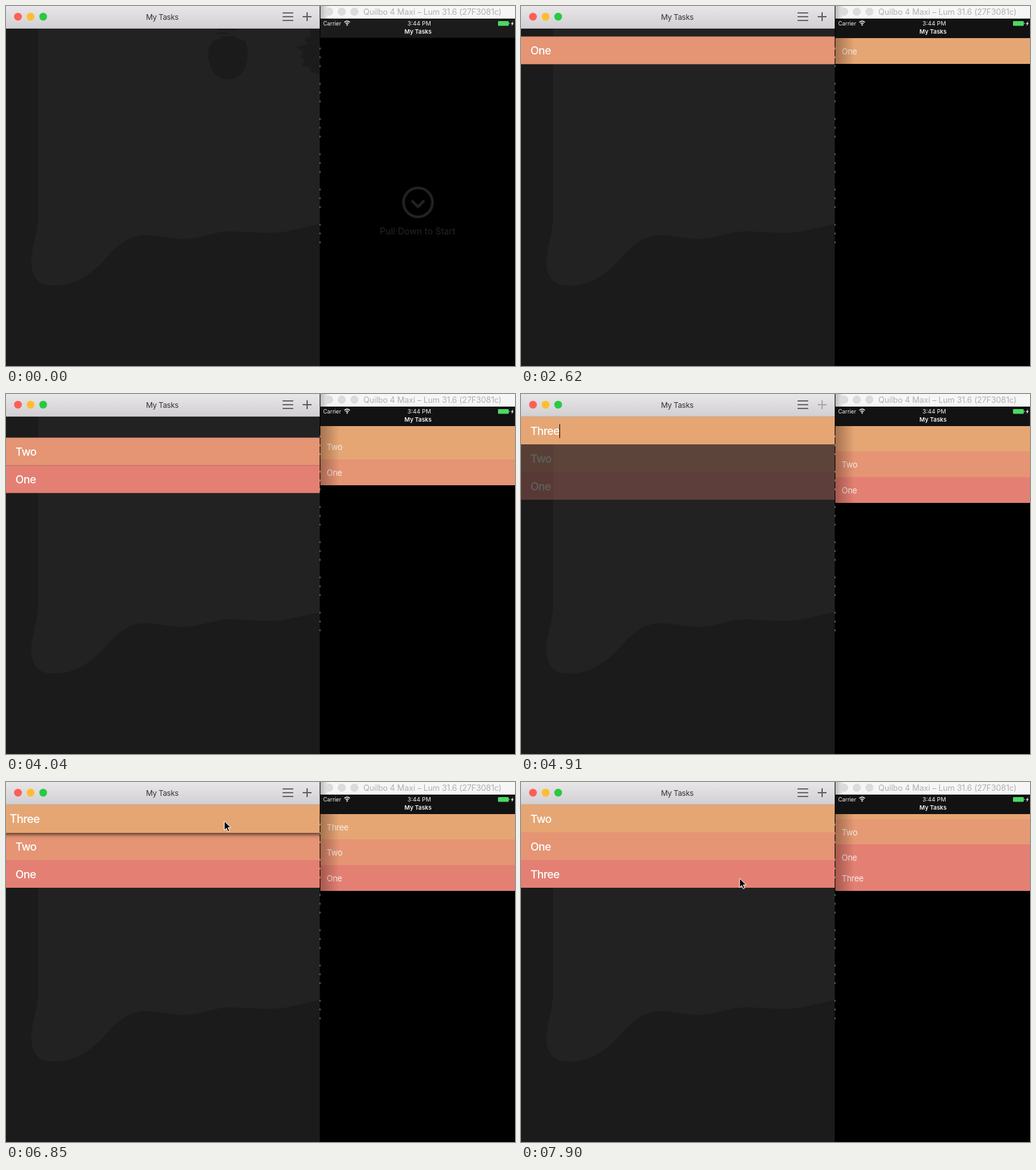
Write an HTML page that moves like this. It is 808x572 px and loops after 7.99 s.

```html
<!DOCTYPE html>
<html lang="en">
<head>
<meta charset="utf-8">
<title>My Tasks</title>
<style>
html, body { margin: 0; width: 100%; height: 100%; overflow: hidden; background: #000; }
#stage { position: relative; width: 808px; height: 572px; overflow: hidden; font-family: Inter, Roboto, sans-serif; }
#stage > svg { position: absolute; left: 0; top: 0; }
.pane { position: absolute; overflow: hidden; isolation: isolate; }
#mac { left: 0; top: 36px; width: 498px; height: 536px; }
#phone { left: 499px; top: 51px; width: 309px; height: 521px; }
.row { position: absolute; left: 0; top: 0; width: 100%; box-sizing: border-box; display: flex; align-items: center; white-space: pre; }
#mac .row { height: 44px; padding: 1px 0 0 15px; color: #fff; font-size: 17.5px; font-weight: 500; letter-spacing: -.6px; }
#phone .row { height: 41px; padding-left: 10px; color: #f8eee8; font-size: 13px; letter-spacing: -.25px; }
.caret { width: 1px; height: 22px; background: #000; }
.shade { position: absolute; inset: 0 -6px; box-shadow: inset 0 0 0 50px rgba(0,0,0,.05), inset 0 2px 2px rgba(0,0,0,.22), inset 0 -2px 2px rgba(0,0,0,.22); }
#edge { position: absolute; left: 0; top: 0; width: 30px; mix-blend-mode: multiply; background: linear-gradient(90deg, rgba(70,45,35,.38), rgba(70,45,35,0)); }
#slot { position: absolute; left: 0; top: 0; width: 100%; height: 41px; }
</style>
</head>
<body>
<div id="stage">
  <svg width="808" height="572">
    <defs>
      <linearGradient id="bar" x2="0" y2="1">
        <stop stop-color="#e8e6e9"/><stop offset="1" stop-color="#d1cfd2"/>
      </linearGradient>
      <linearGradient id="cast">
        <stop stop-opacity=".25"/><stop offset="1" stop-opacity="0"/>
      </linearGradient>
    </defs>
    <rect width="498" height="572" fill="#1b1b1b"/>
    <path fill="#222" d="M51 36V340C49 365 40 390 40 405C40 430 52 444 72 444C105 446 130 430 152 408C172 386 190 364 222 364C245 365 262 370 284 370C315 368 330 358 360 358C385 359 405 361 430 360C460 357 475 350 498 347V36Z"/>
    <g id="blobs" fill="#1b1b1b">
      <path d="M336 36H366V39H336ZM334 42H354V45H334ZM342 48H366V51H342Z"/>
      <path d="M330 55C345 49 364 49 379 56C386 66 385 88 377 103C366 120 341 121 329 105C319 88 317 66 330 55Z"/>
      <path d="M498 36H482L484 48L474 53L480 60L460 66L472 72L468 80L474 86L470 95L482 97L484 105L498 108Z"/>
    </g>
    <rect width="498" height="36" fill="url(#bar)"/>
    <rect y="35" width="498" height="1" fill="#bbb9bc"/>
    <circle cx="19" cy="17" r="6.2" fill="#ff5f57"/>
    <circle cx="39" cy="17" r="6.2" fill="#ffbd2e"/>
    <circle cx="59" cy="17" r="6.2" fill="#28ca42"/>
    <text x="248" y="22" text-anchor="middle" font-size="12" letter-spacing="-.3" fill="#333">My Tasks</text>
    <path d="M439 11H456M439 17H456M439 23H456" stroke="#6b696c" stroke-width="2"/>
    <path id="plus" d="M471 17H485M478 10V24" stroke="#605e61" stroke-width="2"/>

    <rect x="498" width="310" height="572"/>
    <path d="M498.5 66V380" stroke="#888" stroke-dasharray="3 11 3 11 3 25"/>
    <rect x="499" width="309" height="20" fill="#f6f6f6"/>
    <rect x="499" width="14" height="20" fill="url(#cast)"/>
    <g fill="#dcdcdc" stroke="#d0d0d0" stroke-width=".6">
      <circle cx="513" cy="9" r="6"/><circle cx="533" cy="9" r="6"/><circle cx="553" cy="9" r="6"/>
    </g>
    <text x="677" y="14" text-anchor="middle" font-size="12.8" letter-spacing="-.1" fill="#b0b0b0">Quilbo 4 Maxi – Lum 31.6 (27F3081c)</text>
    <rect x="499" y="20" width="309" height="30.5" fill="#1b1b1b"/>
    <rect id="veil" x="499" y="20" width="309" height="31" fill="#121212"/>
    <g fill="#f4f4f4" font-size="9">
      <text x="503.5" y="31" font-size="8.7">Carrier</text>
      <text x="656" y="31" text-anchor="middle" font-size="9.3">3:44 PM</text>
      <text x="654" y="44" text-anchor="middle" font-weight="600" font-size="9.4">My Tasks</text>
      <path d="M537 26Q541.500 22 546 26M539 28Q541.500 25.800 544 28" fill="none" stroke="#f4f4f4" stroke-width="1.4"/>
      <circle cx="541.5" cy="30" r="1.2"/>
      <path d="M805 24L801.500 28.500H803.500L802.500 32L806 27.200H804Z"/>
    </g>
    <rect x="781" y="24" width="17" height="7.500" rx="1.300" fill="#4cd964"/>
    <rect x="798.500" y="26.500" width="1.200" height="2.500" fill="#4cd964"/>
    <g id="hint">
      <circle cx="654" cy="312" r="23" fill="none" stroke="#222" stroke-width="4.200"/>
      <path d="M644 309L654 319L664 309" fill="none" stroke="#222" stroke-width="4.200"/>
      <text x="653.500" y="363" text-anchor="middle" font-size="14.200" fill="#242424">Pull Down to Start</text>
    </g>
  </svg>
  <div id="mac" class="pane"></div>
  <div id="phone" class="pane"><div id="slot"></div></div>
  <svg width="808" height="572">
    <path id="cursor" d="M0 0V14.500L3.400 11.400L5.700 16.600L8.200 15.500L5.900 10.500H10.300Z" stroke="#fff" stroke-width="1"/>
  </svg>
</div>
<script>
const LOOP = 7990, STEP = 88.15, FIRST = 1080, BASE = 1380;
const MAC_ROW = 44, PHONE_ROW = 40.5;
const COLORS = [[229, 166, 116], [229, 148, 116], [228, 128, 115]];
const DROP = 7540, SYNC = 7740;

// insert: start of the row insertion; keys: when each piece of text is typed
const TASKS = [
  { name: 'One', insert: 1050, remote: 1120, commit: 2080, keys: [[1640, 1], [1820, 2], [1910, 3]], from: 2, to: 1, swap: 7290 },
  { name: 'Two', insert: 2540, remote: 2600, commit: 3590, keys: [[3150, 1], [3330, 2], [3410, 3]], from: 1, to: 0, swap: 7000 },
  { name: 'Three', insert: 3870, remote: 3930, commit: 5080, keys: [[4290, 1], [4650, 3], [4730, 4], [4910, 5]], from: 0, to: 2 }
];
const PLUS_OFF = [[1080, 2080], [3150, 3590], [4290, 5080]];
const CURSOR_X = [[5535, 619], [5623, 546], [5715, 546], [5800, 440], [5888, 385], [5976, 360], [6064, 350], [6240, 346], [7470, 347]];
const CURSOR_Y = [[5535, 347], [5623, 282], [5715, 282], [5800, 150], [5888, 86], [5976, 67], [6064, 64], [6240, 62], [6870, 62], [7210, 113], [7470, 153]];

const $ = id => document.getElementById(id);
const ramp = (t, a, b) => Math.min(1, Math.max(0, (t - a) / (b - a)));
const ease = (t, a, b) => { const x = ramp(t, a, b); return x * x * (3 - 2 * x); };
const lerp = (a, b, x) => a + (b - a) * x;

function track(keys, t) {
  let v = keys[0][1];
  for (let i = 1; i < keys.length; i++) v = lerp(v, keys[i][1], ramp(t, keys[i - 1][0], keys[i][0]));
  return v;
}

function shadeOf(index) {
  const i = Math.min(1, Math.floor(index));
  return `rgb(${COLORS[i].map((c, n) => Math.round(lerp(c, COLORS[i + 1][n], index - i)))})`;
}

function addRow(pane, z) {
  const row = document.createElement('div');
  row.className = 'row';
  row.style.zIndex = z;
  row.label = row.appendChild(document.createElement('span'));
  $(pane).append(row);
  return row;
}

TASKS.forEach((task, i) => {
  task.mac = addRow('mac', i);
  task.caret = task.mac.appendChild(document.createElement('div'));
  task.caret.className = 'caret';
  task.phone = addRow('phone', 5 - i);
});
const shade = TASKS[1].mac.appendChild(document.createElement('div'));
shade.className = 'shade';
const edge = $('phone').appendChild(document.createElement('div'));
edge.id = 'edge';
edge.style.zIndex = 9;
$('slot').style.background = shadeOf(0);

const show = (el, on) => { el.style.display = on ? '' : 'none'; };
const sum = (list, f) => list.reduce((s, x) => s + f(x), 0);

function drawMac(task, later, t, cy) {
  const { mac, insert, commit } = task;
  const settle = ease(t, DROP, DROP + 100);
  let y = MAC_ROW * sum(later, n => ease(t, n.insert, n.insert + 245));
  let lift = 0;
  if (task.swap) {
    y += MAC_ROW * (task.to - task.from) * ease(t, task.swap, task.swap + 150);
  } else if (t > 6670) {
    y = lerp(cy - 62, 2 * MAC_ROW, settle);
    lift = ease(t, 6670, 6850) - settle;
  }
  const dim = sum(later, n => ramp(t, n.insert + 180, n.insert + 400) - ramp(t, n.commit, n.commit + 180));
  const recolor = ramp(t, DROP, DROP + 160);
  const index = lerp(later.filter(n => t >= n.insert).length, task.to, recolor);
  const typed = task.keys.filter(k => t >= k[0]).pop();

  task.mac.label.textContent = task.name.slice(0, typed ? typed[1] : 0);
  show(task.caret, t > insert + 330 && t < commit);
  mac.style.opacity = ramp(t, insert + 170, insert + 330) * (1 - .7 * dim);
  mac.style.transform = `translateY(${y}px) scale(${1 + .04 * lift})`;
  mac.style.background = shadeOf(index);
  mac.style.boxShadow = `0 2px 6px rgba(0,0,0,${.75 * lift})`;
}

function drawPhone(task, later, t) {
  const { phone, remote, commit } = task;
  let slot = sum(later, n => ease(t, n.remote, n.remote + 287));
  let index = sum(later, n => ramp(t, n.remote + 130, n.remote + 360));
  if (task.swap) {
    slot += (task.to - task.from) * ease(t, SYNC - 18, SYNC + 253);
    index += (task.to - task.from) * ramp(t, 7890, 7970) * (task.to ? 0 : 1);
  } else if (t > SYNC) {
    slot = index = 2;
  }
  phone.label.textContent = t >= commit + 60 ? task.name : '';
  show(phone, t >= remote);
  phone.style.opacity = later.length === 2 ? ramp(t, remote, remote + 220) : 1;
  phone.style.transform = `translateY(${Math.floor(slot * PHONE_ROW)}px)`;
  phone.style.background = shadeOf(index);
}

function draw(t) {
  const cx = track(CURSOR_X, t), cy = track(CURSOR_Y, t);
  TASKS.forEach((task, i) => {
    const later = TASKS.slice(i + 1);
    drawMac(task, later, t, cy);
    drawPhone(task, later, t);
  });
  show($('slot'), t > SYNC);
  show(edge, t > 1200);
  edge.style.height = PHONE_ROW * sum(TASKS, n => ease(t, n.remote, n.remote + 287)) + 'px';
  show(shade, t >= 5880 && t < 6230);
  show($('blobs'), t < TASKS[1].insert);
  $('hint').style.opacity = 1 - ramp(t, 1080, 1300);
  $('veil').style.opacity = ramp(t, 1080, 1300);
  $('plus').style.opacity = PLUS_OFF.some(([a, b]) => t >= a && t < b) ? .42 : 1;
  show($('cursor'), t >= 5530);
  $('cursor').setAttribute('transform', `translate(${cx} ${cy})`);
}

function clock(ms) {
  const t = ms % LOOP;
  if (t < FIRST) return 0;
  const k = Math.max(-3, Math.floor((t - BASE + 5) / STEP));
  return BASE + 12 + k * STEP;
}

const begin = performance.now();
function tick() {
  draw(clock(performance.now() - begin));
  requestAnimationFrame(tick);
}
tick();
</script>
</body>
</html>
```
